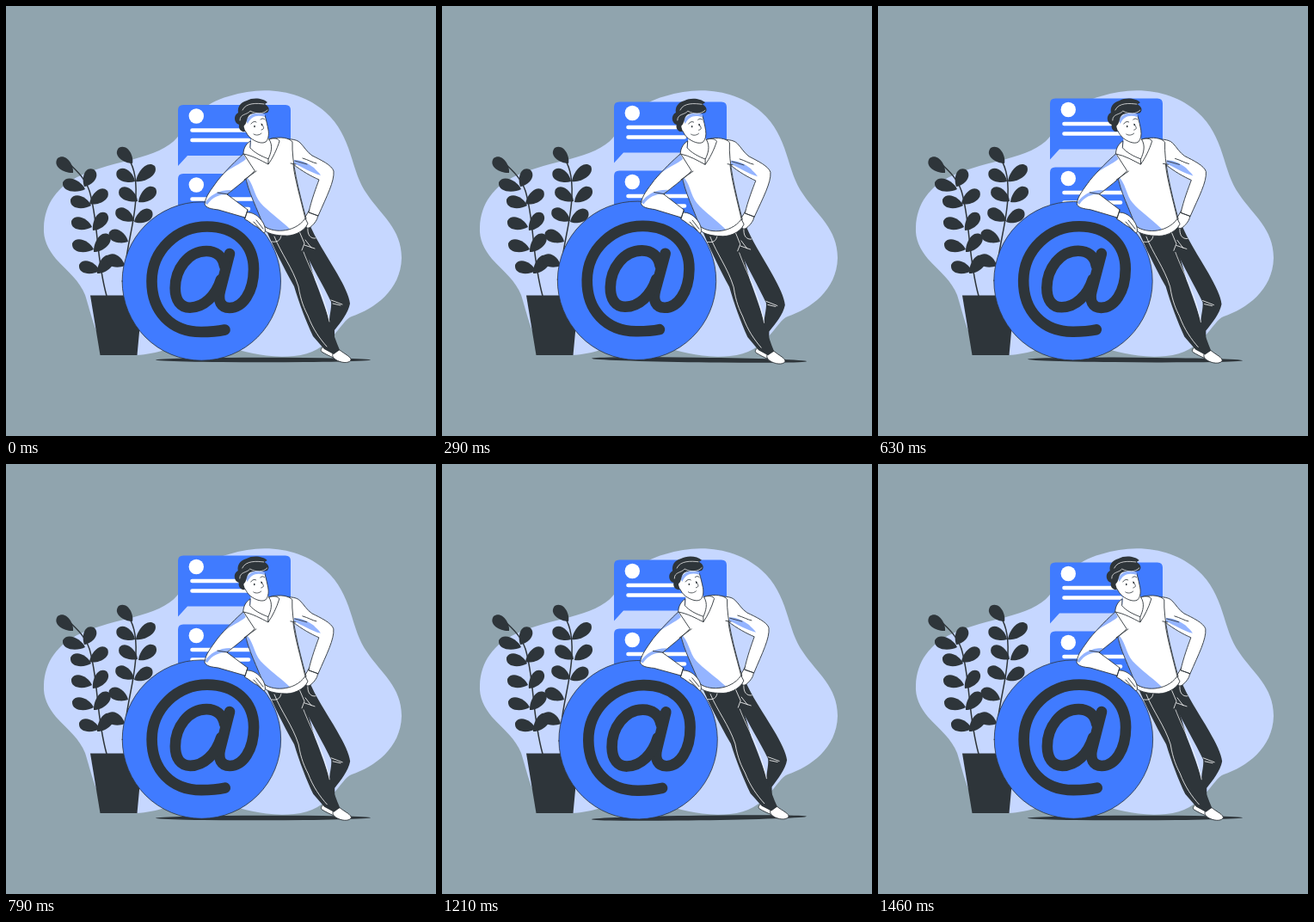
Animation of 500 by 500 pixels, one loop 1.5 s. Source, as an HTML page with a canvas:

```html
<!DOCTYPE html>
<html lang="en">
<head>
<meta charset="utf-8">
<title>Leaning on the at sign</title>
<style>
html, body { margin: 0; width: 100%; height: 100%; overflow: hidden; background: #90a4ae; }
canvas { display: block; width: 500px; height: 500px; }
</style>
</head>
<body>
<canvas id="stage" width="500" height="500"></canvas>
<script>
const ctx = document.getElementById('stage').getContext('2d');
const BLUE = '#407bff', PALE = '#c6d7ff', SHADE = '#94b4ff', DARK = '#2e353a', WHITE = '#fff';
const LOOP = 1500, STEPS = 36, LIFT = 9, SWAY = Math.PI / 180;

function fill(d, color) {
  ctx.fillStyle = color;
  ctx.fill(new Path2D(d));
}

function line(d, color = DARK, width = 0.9) {
  ctx.strokeStyle = color;
  ctx.lineWidth = width;
  ctx.stroke(new Path2D(d));
}

function outlined(d, color = WHITE) {
  fill(d, color);
  line(d);
}

function ellipse(x, y, rx, ry, color) {
  ctx.beginPath();
  ctx.ellipse(x, y, rx, ry, 0, 0, Math.PI * 2);
  ctx.fillStyle = color;
  ctx.fill();
}

function rotated(x, y, angle, paint) {
  ctx.save();
  ctx.translate(x, y);
  ctx.rotate(angle);
  ctx.translate(-x, -y);
  paint();
  ctx.restore();
}

function leaf([x, y, tipX, tipY]) {
  const size = Math.hypot(tipX - x, tipY - y) / 24;
  ctx.save();
  ctx.translate(x, y);
  ctx.rotate(Math.atan2(tipY - y, tipX - x));
  ctx.scale(size, 1);
  fill('M0 0C6-7 22-12 24 0C22 11 6 8 0 0Z', DARK);
  ctx.restore();
}

function blob() {
  fill(`M44 257C45 230 60 209 87 197C126 179 178 178 199 153C216 131 229 113 259 105
    C303 91 345 100 371 123C404 152 400 192 420 219C436 243 460 259 460 293
    C459 331 428 352 402 361C388 366 378 404 335 407C302 410 280 402 255 396
    C225 389 197 396 181 401C161 407 127 410 114 396C103 379 97 351 92 336
    C86 320 71 308 58 294C49 283 43 271 44 257Z`, PALE);
}

function bubble(y) {
  ctx.save();
  ctx.translate(200, y);
  fill('M0 71V6Q0 0 6 0H125Q131 0 131 6V53Q131 59 125 59H11Z', BLUE);
  ellipse(21.3, 13, 8.7, 8.7, WHITE);
  line('M16.5 29.5H86M16.5 41H82', WHITE, 4.6);
  ctx.restore();
}

const LEAVES = [
  [78, 194, 60, 177], [92, 213, 66, 205], [99, 232, 75, 225], [100, 257, 76, 250],
  [102, 283, 77, 276], [109, 308, 85, 301], [91, 210, 102, 190], [97, 230, 118, 215],
  [101, 261, 117, 241], [102, 286, 120, 266], [106, 311, 124, 291],
  [147, 183, 131, 165], [151, 204, 173, 186], [154, 228, 174, 212], [150, 204, 129, 192],
  [153, 227, 132, 213], [149, 251, 170, 239], [149, 250, 128, 237], [142, 274, 120, 263],
  [138, 302, 117, 292]
];

function plant() {
  line('M117 337C104 290 108 252 97 215C92 201 84 193 72 182', DARK, 1.5);
  line('M140 337C133 294 150 260 151 221C152 198 148 184 139 172', DARK, 1.5);
  LEAVES.forEach(leaf);
  fill('M98 336.5H159L152.5 406H109.5Z', DARK);
}

function wheel() {
  ellipse(227.3, 320, 92.2, 92.2, BLUE);
  line('M135.1 320A92.2 92.2 0 1 1 319.5 320A92.2 92.2 0 1 1 135.1 320Z', DARK, 0.8);
  line(`M254.5 376.5C245 378.5 236 379 227 379C192 379 169.5 355 169.5 320
    C169.5 284 199 256.5 234 256.5C266 256.5 288 276 288 306C288 333 275 351 260 351
    C250 351 246 343 249 331L260 288`, DARK, 12.6);
  line(`M254 302C252 291 244 285 233 285C212 285 196.7 306 196.7 328
    C196.7 342 203 350.7 214 350.7C230 350.7 244 337 250 318`, DARK, 12.6);
}

function legs() {
  outlined('M371 395C367 397 365 400 367 402C372 405 376 407 381 409L386 403Z');
  outlined('M381 402C379 405 379 408 383 411C389 415 398 416 401 412C402 408 394 405 388 400Z');
  fill(`M326 262L352 251C359 270 373 290 385 311C393 325 399 337 400 346
    C398 357 389 368 382 377L382 388L372 398L376 372C375 362 379 352 378 344
    C369 325 355 302 346 282Z`, DARK);
  fill(`M302 259C311 280 321 301 335 326C341 346 349 367 357 384L370 399L381 405L388 400
    C384 391 380 379 377 370C373 355 366 336 359 318L348 280L352 252L326 266Z`, DARK);
  line('M346 286C354 308 369 332 376 367', WHITE, 0.7);
  line('M312 268C320 288 333 304 340 326C343 344 347 352 351 360C357 376 365 387 373 396', WHITE, 0.8);
  line('M320 267C319 273 315 275 309 274M341 262L347 276L344 284M348 272L355 281M347 278L359 282', WHITE, 0.8);
  line('M351 257C350 266 354 271 360 270M378 342L391 347M380 346L389 348', WHITE, 0.8);
}

function rightArm() {
  outlined('M361 239C364 244 362 248 359 252C355 257 351 260 349 257L347 247L354 235Z');
  outlined(`M318 154C328 155 337 154 342 159C347 164 350 170 356 174
    C366 179 379 185 381 192C382 204 373 221 363 244L352 240
    C355 226 361 210 364 202C355 198 344 192 334 184Z`);
  fill('M335 179C343 179 350 182 358 188C360 191 364 193 366 197C355 194 344 187 335 183Z', SHADE);
  line('M336 180L350 184M345 177C352 179 356 182 361 183M352 240L363 244');
}

function torso() {
  const body = `M276 172C284 163 297 158 309 154C319 152 329 153 333 158
    C332 181 340 214 349 247C346 257 335 265 326 264C315 264 305 261 299 255
    C293 237 281 216 278 196Z`;
  fill(body, WHITE);
  fill(`M278 197C288 205 288 220 296 229C305 239 316 246 331 260
    C319 265 306 261 299 255C293 237 281 216 278 197Z`, SHADE);
  line(body);
  outlined('M299 255C308 264 335 265 348 247L351 253C346 264 331 268 324 267C315 267 306 265 302 262Z');
  line('M334 184C335 198 343 226 348 247M331 183L337 184');
}

function leftArm() {
  outlined('M278 240C287 239 294 244 299 252C302 258 302 263 300 264L292 257C287 255 284 251 278 248Z');
  line('M291 249L299 259M288 251L297 261');
  const arm = `M276 172C268 179 256 191 246 203C239 213 232 221 231 230
    C232 235 239 236 247 237L278 246L281 237L257 219C267 211 279 202 289 192Z`;
  fill(arm, WHITE);
  fill('M231 229C238 220 246 214 262 214L257 219C248 219 240 222 234 231Z', SHADE);
  fill('M276 172C268 179 260 186 253 195C263 187 272 184 279 178Z', SHADE);
  line(arm);
  line('M281 237L278 247M246 217L258 219M277 202L291 192');
}

function neck() {
  fill('M285 150L284 169L305 181L311 159L302 151Z', WHITE);
  outlined('M284 157C278 161 276 167 276 172C287 174 297 180 305 184L306 178C297 175 288 170 284 165Z');
  outlined('M306 155C311 153 317 154 318 157C315 167 310 177 305 184L305 178C308 171 311 163 306 155Z');
}

function head() {
  outlined(`M279 128C286 123 297 123 301 127C303 134 304 139 305 144
    C306 150 305 155 302 158C297 161 289 157 285 154C281 151 280 148 278 145
    C274 146 272 138 276 137Z`);
  fill('M279 133C285 123 295 123 301 126L301 129C292 126 285 128 281 137Z', SHADE);
  fill(`M278 146C273 147 270 142 271 138C265 136 264 127 270 124
    C269 118 272 112 280 110C287 106 299 107 304 112L301 114
    C306 117 307 121 304 124C298 126 292 123 286 125C279 128 281 134 278 138
    C275 140 278 142 278 146Z`, DARK);
  line('M272 133C272 125 280 127 284 122C291 126 299 126 304 121M275 121C279 112 292 113 300 114', WHITE, 0.7);
  line('M285 137C287 134 290 134 291 135M296 132C298 130 300 131 301 132', DARK, 0.9);
  ellipse(289, 140, 0.8, 1.2, DARK);
  ellipse(297.5, 138, 0.8, 1.2, DARK);
  line('M297 137C300 141 301 143 297 144M288 149C291 151 295 150 297 148', DARK, 0.8);
}

function leaningScene() {
  wheel();
  legs();
  rightArm();
  torso();
  leftArm();
  neck();
  head();
}

// Triangle wave: 0, 1, 0, -1 at successive quarters.
function swing(p) {
  return p < 0.25 ? 4 * p : p < 0.75 ? 2 - 4 * p : 4 * p - 4;
}

function draw(time) {
  const step = Math.floor((time % LOOP + 4) * STEPS / LOOP) % STEPS;
  const p = step / STEPS;
  const lift = LIFT * (1 - Math.abs(1 - 2 * p));
  const angle = SWAY * swing(p);
  ctx.fillStyle = '#90a4ae';
  ctx.fillRect(0, 0, 500, 500);
  ctx.lineCap = ctx.lineJoin = 'round';
  blob();
  bubble(115 - lift);
  bubble(195 - lift);
  plant();
  rotated(299, 411.5, angle, () => ellipse(299, 411.5, 125, 2.8, DARK));
  rotated(279, 262, angle, leaningScene);
}

let start;
function tick(now) {
  start ??= now;
  draw(now - start);
  requestAnimationFrame(tick);
}
draw(0);
requestAnimationFrame(tick);
</script>
</body>
</html>
```
